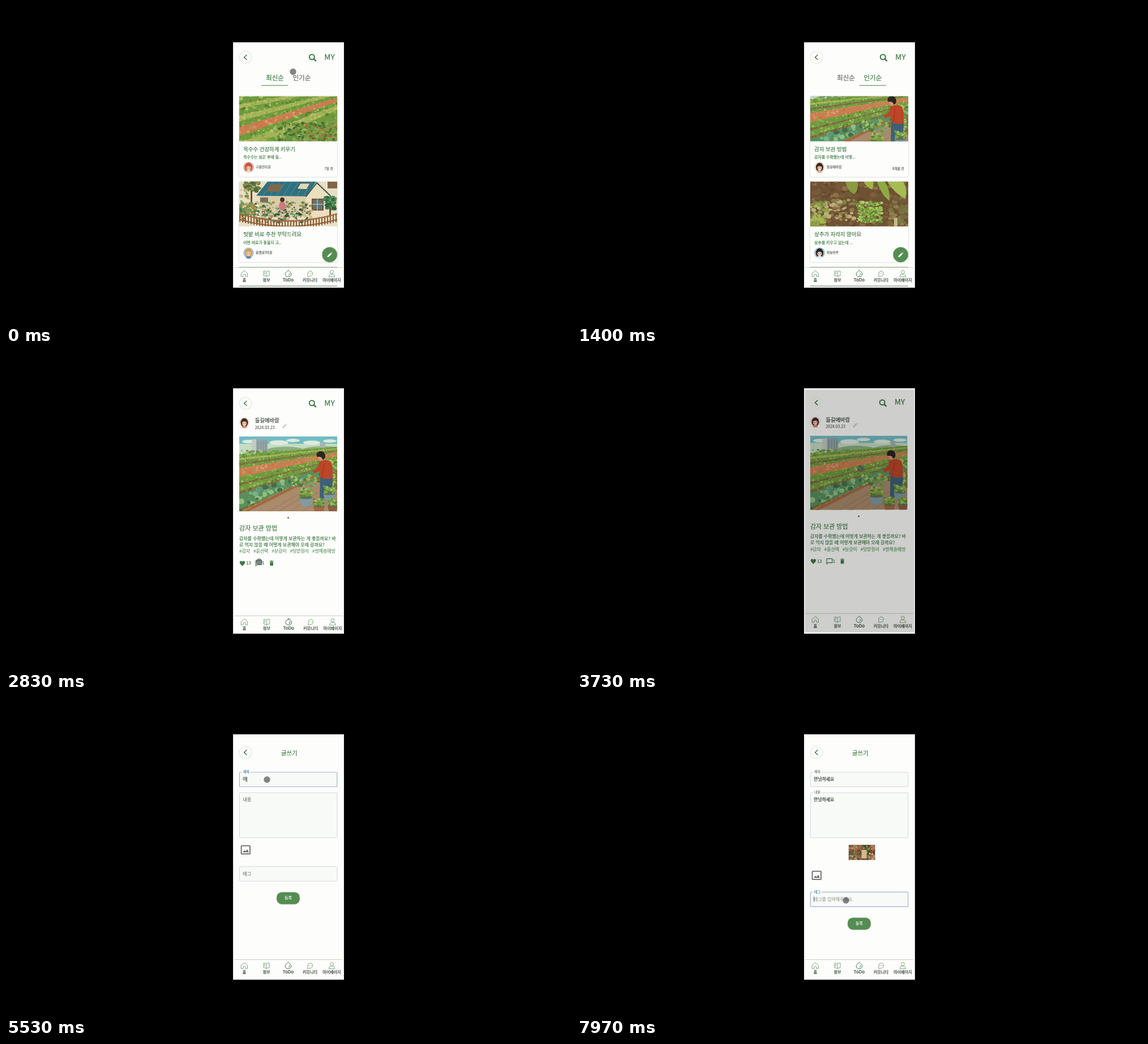
An HTML page for the animation above (8 s loop, 998 by 561 pixels).

```html
<!DOCTYPE html>
<html lang="ko">
<head>
<meta charset="utf-8">
<title>Garden board</title>
<style>
html, body { margin: 0; width: 100%; height: 100%; overflow: hidden; background: #000; }
svg { display: block; }
#stage { width: 100vw; height: 100vh; }
text {
  font-family: "Noto Sans CJK KR", "Noto Sans CJK", "Noto Sans", sans-serif;
  font-weight: 500; white-space: pre;
  fill: currentColor; stroke: currentColor; stroke-width: .2px;
}
.shade { filter: drop-shadow(0 .7px .8px rgba(60, 80, 60, .34)); }
.line { fill: none; stroke-linecap: round; stroke-linejoin: round; }
.soft { filter: blur(.6px); }
</style>
</head>
<body>
<svg id="stage" viewBox="0 0 998 561" preserveAspectRatio="none"></svg>
<script>
const LOOP = 8000;
const GREEN = '#3f7a46', SOFT = '#6f9f70', FILL = '#548d51', GREY = '#626863';
const ZOOM = 0.9915;

// Markup helpers
const text = (x, y, size, str, color = GREEN, extra = '') =>
  `<text x="${x}" y="${y}" font-size="${size}" color="${color}" ${extra}>${str}</text>`;
const mid = 'text-anchor="middle"';
const rect = (x, y, w, h, fill, extra = '') =>
  `<rect x="${x}" y="${y}" width="${w}" height="${h}" fill="${fill}" ${extra}/>`;
const disc = (x, y, r, fill, extra = '') => `<circle cx="${x}" cy="${y}" r="${r}" fill="${fill}" ${extra}/>`;
const oval = (x, y, rx, ry, fill, extra = '') =>
  `<ellipse cx="${x.toFixed(1)}" cy="${y.toFixed(1)}" rx="${rx.toFixed(1)}" ry="${ry.toFixed(1)}" fill="${fill}" ${extra}/>`;
const shape = (d, fill, extra = '') => `<path d="${d}" fill="${fill}" ${extra}/>`;
const stroke = (d, color, w = 1) => `<path class="line" d="${d}" stroke="${color}" stroke-width="${w}"/>`;
const group = (id, body, extra = '') => `<g id="${id}" ${extra}>${body}</g>`;
const photo = (x, y, w, h, top, body) =>
  `<svg x="${x}" y="${y}" width="${w}" height="${h}" viewBox="0 ${top} ${w} ${h}">${body}</svg>`;

const random = seed => () => (seed = seed * 16807 % 2147483647) / 2147483647;
const pick = (rnd, list) => list[Math.floor(rnd() * list.length)];
const lerp = (a, b, k) => a + (b - a) * k;
const clamp = v => Math.max(0, Math.min(1, v));
const ease = k => k * k * (3 - 2 * k);
const ramp = (t, start, length) => ease(clamp((t - start) / length));

function leaves(seed, n, [x0, y0, x1, y1], colors, r) {
  const rnd = random(seed);
  let out = '';
  for (let i = 0; i < n; i++) {
    const s = r * (0.5 + rnd());
    out += oval(lerp(x0, x1, rnd()), lerp(y0, y1, rnd()), s, s * 0.75, pick(rnd, colors));
  }
  return out;
}

// Planted rows that run from the left edge to one vanishing point
function rows(seed, edges, beds, vx, vy, n) {
  const rnd = random(seed);
  let out = '';
  beds.forEach((colors, i) => {
    const a = edges[i], b = edges[i + 1];
    out += shape(`M0 ${a}V${b}L${vx} ${vy}Z`, colors[0]);
    for (let j = 0; j < n; j++) {
      const x = rnd() * 173, k = x / vx, r = 0.5 + (b - a) * (1 - k) * (0.05 + rnd() * 0.13);
      out += oval(x, lerp(lerp(a, b, rnd()), vy, k), r * 1.2, r, pick(rnd, colors));
    }
  });
  return out;
}

const lush = ['#6f9a3e', '#8fb84e', '#557f35', '#a9c465', '#7aa545'];
const teal = ['#5a8f5c', '#7fb187', '#40704a', '#94bd83', '#5f9a78'];
const coral = ['#c87d4f', '#dd8a5a', '#a79a52', '#d56c4a', '#e09c6c'];
const soil = ['#80683c', '#9a7d4c', '#566b33', '#7f9a48', '#a78d5c'];
const gold = ['#a3b356', '#bcc26c', '#8aa84a', '#c9b566'];

function pot(x, y, s, color) {
  return shape(`M${x - 11 * s} ${y}h${22 * s}l${-3 * s} ${13 * s}q${-8 * s} ${4 * s} ${-16 * s} 0z`, color) +
    oval(x, y, 11 * s, 2.4 * s, '#5f6f5a') +
    leaves(Math.round(x * 7919 + 13), 60, [x - 10 * s, y - 15 * s, x + 10 * s, y - 1], lush, 1.9 * s);
}

function fieldScene() {
  const clouds = [[18, 9, 13], [70, 11, 17], [95, 7, 12], [128, 11, 15], [160, 8, 12]]
    .map(([x, y, r]) => oval(x, y, r, r * 0.25, '#dcebdc')).join('');
  return rect(0, 0, 173, 132, '#72bcc4') + rect(0, 13, 173, 24, '#c6dcc2') + clouds +
    oval(82, 27, 38, 9, '#8db083') + oval(148, 26, 40, 9, '#94b384') +
    rect(22, 5, 28, 30, '#94a6a6') + rect(22, 5, 8, 30, '#c3cbc4') +
    stroke('M33 8v24M38 8v24M43 8v24M47 8v24', '#788d8e', 1) + rect(143, 10, 9, 20, '#a3b4ad') +
    leaves(90211, 150, [0, 25, 173, 35], ['#7a9f5c', '#94b36c', '#afc384', '#6a9052'], 2.2) +
    rows(48271, [32, 38, 42, 47, 51, 56, 60, 72, 83, 87, 97, 102, 128, 140, 200],
      [lush, gold, lush, soil, lush, coral, coral, lush, soil, lush, soil, teal, soil, soil], 300, 8, 75) +
    shape('M14 132L88 95L130 78L173 90V132Z', '#a98a6b') +
    stroke('M52 132L112 98M70 132L130 96M90 132L140 98M112 132L156 100M136 132L173 102', '#8a6a4e', 0.7) +
    stroke('M12 132L84 96L132 71', '#a5683f', 4) + stroke('M8 131L82 93L130 69', '#c0845a', 1) +
    leaves(66103, 110, [92, 68, 136, 88], [...teal, ...lush], 2) +
    leaves(27103, 60, [160, 40, 173, 92], lush, 2.2) +
    // gardener seen from behind
    shape('M143 72L142 112Q147 117 150 112L155 86L158 110H164L165 70Z', '#3c6079') +
    shape('M141 45Q153 38 162 45Q167 58 164 74Q153 77 143 72Q141 65 143 61L132 65L130 61L139 54Z', '#bd4528') +
    stroke('M150 48Q149 60 146 72', '#96331f', 1) +
    oval(145, 37, 5.5, 6, '#d49b77') + shape('M137 36Q135 27 143 26Q152 26 152 35Q151 41 147 41Q147 35 137 36Z', '#2c2522') +
    pot(118, 108, 1.05, '#7f9ba3') + pot(159, 101, 0.95, '#7898a2') + pot(141, 123, 0.9, '#a3673f') + pot(165, 122, 0.8, '#8a5f3f');
}

function stripesScene() {
  return rect(0, 0, 173, 80, '#7f9a45') +
    `<g class="soft">${rows(77773, [-4, 14, 22, 34, 44, 54, 58, 70, 82, 100, 130],
      [lush, gold, lush, gold, lush, coral, coral, lush, gold, lush], 330, -45, 75)}
    ${leaves(30313, 220, [66, 46, 173, 80], ['#4f7832', '#6a9440', '#8dab54', '#456a30', '#7a8a48'], 2.3)}
    ${leaves(51517, 16, [116, 46, 173, 78], ['#b9673d', '#c4563a'], 2)}</g>`;
}

function houseScene() {
  let fence = '';
  for (let x = 0; x < 173; x += 5) {
    const y = 56 + 12 * Math.sin(Math.PI * x / 173);
    fence += rect(x, y, 2, 15, '#8a5834');
  }
  return rect(0, 0, 173, 80, '#e9dfc4') +
    rect(20, 6, 3, 32, '#6f4d30') + leaves(71011, 60, [9, -1, 36, 17], ['#6e7f40', '#8b9550', '#52693a'], 2.6) +
    leaves(12007, 30, [0, 14, 16, 66], ['#d1a25a', '#76935a', '#c4b480'], 2.8) +
    shape('M36 24H122L137 4L160 26V62H36Z', '#d9cda9') + shape('M118 26L137 4L160 26V64H118Z', '#eadfbf') +
    shape('M30 25L50 0H136L118 26Z', '#2f7180') +
    stroke('M42 24L60 1M54 24L71 1M66 24L82 1M78 25L93 1M90 25L104 1M102 25L115 1M114 25L127 1', '#5392a0', 1) +
    stroke('M118 26L137 2L161 25', '#3c5450', 2) +
    shape('M48 17L54 5H77L71 18Z', '#80694b') + shape('M102 13L108 3H125L119 14Z', '#d8dabe', 'stroke="#574532"') +
    rect(37, 28, 14, 9, '#777158') + rect(129, 31, 19, 19, '#597579', 'stroke="#7a4d2c" stroke-width="2"') +
    stroke('M138 31v19M129 40h19', '#e6d6ad', 1) +
    leaves(82009, 240, [26, 36, 128, 72], ['#426a45', '#658b53', '#2f5240', '#8b9a5b', '#ad8658', '#c9b98c'], 2.1) +
    oval(76, 43, 6, 8, '#cf7684') + disc(76, 32, 4, '#4a3028') +
    leaves(44017, 70, [151, 27, 169, 49], ['#3d7c4b', '#55905a', '#2f6040'], 2.8) + rect(159, 46, 3, 16, '#6f4d30') +
    leaves(19013, 40, [0, 38, 28, 60], ['#4b7d51', '#a98b4c', '#6f9a58'], 2.8) +
    rect(156, 0, 17, 12, '#836348') + fence +
    stroke('M0 57Q86 82 173 57', '#a06b3f', 2.4) + stroke('M0 67Q86 91 173 67', '#8f5c36', 2);
}

function soilScene() {
  return rect(0, 0, 173, 80, '#6f5134') +
    `<g class="soft">${leaves(61007, 190, [0, 0, 173, 80], ['#80603c', '#634a2e', '#8f7048', '#6b5f34', '#775a38'], 4)}
    ${leaves(23011, 60, [2, 36, 32, 70], ['#93a14b', '#768a42', '#a9b25c', '#b8b37c'], 3.2)}
    ${leaves(39019, 55, [32, 32, 78, 68], ['#b09867', '#8a7b4e', '#c2ac7c', '#7c8446'], 3)}
    ${leaves(91009, 40, [138, 40, 173, 78], ['#7d6a3e', '#927f52', '#6f7c40'], 3.4)}
    ${shape('M62 0Q66 18 78 22Q86 14 84 0Z', '#8a9a40') + shape('M94 0Q101 12 110 14L112 0Z', '#a1b548')}
    ${shape('M118 0Q126 25 140 34Q142 18 132 0Z', '#8fa942') + shape('M136 0Q150 22 168 30Q173 14 164 0Z', '#a6bb52')}
    ${leaves(55021, 240, [83, 36, 127, 72], ['#80a843', '#a0c058', '#668f38', '#b3cb70', '#74953e'], 2.2)}
    ${rect(148, 64, 6, 16, '#c7b886') + leaves(13007, 30, [0, 66, 30, 80], ['#a4b451', '#8d9c46'], 3.4)}</g>`;
}

function cloverScene() {
  const rnd = random(810233);
  let out = rect(0, 0, 173, 80, '#0c3c1a');
  for (let i = 0; i < 170; i++) {
    const x = rnd() * 173, y = rnd() * 80, r = 2.3 + rnd() * 2.2, turn = rnd() * 6.28;
    const color = pick(rnd, ['#145f2a', '#1d7d38', '#289247', '#0f4a20', '#3fae5c', '#2a8a3a']);
    for (let k = 0; k < 3; k++) {
      const a = turn + k * 2.09;
      out += oval(x + Math.cos(a) * r, y + Math.sin(a) * r, r, r * 0.9, color);
    }
    out += disc(x.toFixed(1), y.toFixed(1), 0.6, '#8fd08a');
  }
  return out + leaves(70001, 9, [26, 48, 44, 68], ['#6fc041', '#8ad04c', '#4fa83a'], 4);
}

function collage() {
  const rnd = random(60607);
  let out = rect(0, 0, 47, 27, '#705a3c');
  for (let y = 0; y < 27; y += 9) for (let x = 0; x < 47; x += 7.8)
    out += rect(x + 0.4, y + 0.4, 7.2, 8.3, pick(rnd, ['#5c5b37', '#876642', '#4f472e', '#a4845d'])) +
      leaves(Math.floor(rnd() * 1e6) + 99, 6, [x + 1, y + 1, x + 7, y + 8], ['#8fa04d', '#c4503a', '#d0bc93', '#3d4a2a'], 1.4);
  return out + rect(23, 9, 9, 15, '#d2b98d');
}

function avatar(x, y, r, back, hair, top) {
  return disc(x, y, r, back) + oval(x, y, r * 0.7, r * 0.84, hair) +
    oval(x, y + r * 0.84, r * 0.46, r * 0.24, top) + oval(x, y + r * 0.12, r * 0.43, r * 0.5, '#f3cdb2') +
    shape(`M${x - r * 0.5} ${y}q${r * 0.5} ${-r * 0.95} ${r} 0q${-r * 0.5} ${-r * 0.45} ${-r} 0`, hair) +
    disc(x - r * 0.18, y + r * 0.14, 0.7, '#54362e') + disc(x + r * 0.18, y + r * 0.14, 0.7, '#54362e');
}

// Shared parts
const backButton = y => disc(423, y, 10.3, '#fcfdfb', 'class="shade"') + stroke(`M425 ${y - 4}L420.5 ${y}L425 ${y + 4}`, GREEN, 1.6);
const header = backButton(90.5) + disc(540.3, 90, 4.5, 'none', `stroke="${GREEN}" stroke-width="2.1"`) +
  stroke('M543.8 93.4L547 96.6', GREEN, 2.5) + text(571.5, 94.6, 13.6, 'MY', GREEN, mid);

function navBar() {
  const labels = [[421, '홈'], [460, '정보'], [498.5, 'ToDo'], [537, '커뮤니티'], [575.5, '마이페이지']];
  return rect(403, 461.5, 191, 29, '#fdfdfc') + rect(403, 461, 191, 0.9, '#c3cfbf') +
    stroke('M415.5 471.5L421 466.8L426.5 471.5V477.3H423V474Q421 472 419 474V477.3H415.5Z', SOFT, 0.9) +
    stroke('M460 469Q457.5 467 455 467.6V476Q458 475.6 460 477.3Q462 475.6 465 476V467.6Q462.5 467 460 469V477M457 470v3', SOFT, 0.9) +
    stroke('M498.5 466.3Q493 470.5 493.2 473Q493.6 477.6 498.5 477.6Q503.4 477.6 503.8 473Q504 470.5 498.5 466.3M500.5 471.5q1.5 2.4-1.2 4', GREEN, 1) +
    stroke('M532.8 477L533 471.8Q534 467.6 537.3 467.6Q541.4 468 541.5 472Q541.2 476.6 537 476.8ZM535.3 472h.1M537.2 472h.1M539.1 472h.1', SOFT, 0.9) +
    disc(575.5, 469.3, 2.9, 'none', `stroke="${SOFT}" stroke-width=".9"`) +
    stroke('M570.3 477.3Q570.5 473.4 573.5 473Q575.5 474 577.5 473Q580.5 473.4 580.7 477.3Z', SOFT, 0.9) +
    labels.map(([x, s]) => text(x, 486.2, s === 'ToDo' ? 8 : 7.1, s, '#333b34', mid)).join('');
}

// List page
const cardTops = [159.5, 309.8];
function cardText(y, title, note, name, date) {
  return text(419.3, y + 96, 9.4, title) + text(419.3, y + 109.8, 6.85, note) +
    text(441, y + 126.8, 5.75, name, GREY) + text(577.8, y + 129.6, 5.75, date, GREY, 'text-anchor="end"');
}
const pics = (a, b) => photo(412, cardTops[0], 173, 79, 0, a) + photo(412, cardTops[1], 173, 79, 0, b);
const pencil = (x, y, s, color) =>
  `<path transform="translate(${x} ${y}) scale(${s})" d="M-4 4V2L1.6-3.6L3.6-1.6L-2 4ZM2.3-4.2L3-4.8L4.8-3L4.2-2.3Z" fill="${color}"/>`;

function listPage() {
  const clover = cloverScene();
  return header + text(475, 130.7, 11.6, '최신순', GREEN, mid + ' id="tabNew"') +
    text(522.4, 130.7, 11.6, '인기순', GREY, mid + ' id="tabHot"') +
    rect(451, 139.6, 47.3, 1.1, FILL, 'id="mark"') +
    cardTops.map(y => rect(412, y, 173, 142, '#fdfefc', 'rx="2" class="shade"')).join('') +
    group('newText', cardText(cardTops[0], '옥수수 건강하게 키우기', '옥수수는 심은 후에 밀...', '구름언덕길', '7일 전') +
      cardText(cardTops[1], '텃밭 비료 추천 부탁드려요', '어떤 비료가 좋을지 고...', '봄햇살3마을', '')) +
    group('hotText', cardText(cardTops[0], '감자 보관 방법', '감자를 수확했는데 어떻...', '들길에바람', '8개월 전') +
      cardText(cardTops[1], '상추가 자라지 않아요', '상추를 키우고 있는데 ...', '하늘마루', '')) +
    group('newPics', pics(stripesScene(), houseScene()) +
      avatar(428.5, 284.5, 9.4, '#e9a79a', '#c4553e', '#efe0d2') + avatar(428.5, 435.5, 9.4, '#a9c6e6', '#d9a052', '#5e86b5')) +
    group('hotPics', photo(412, cardTops[0], 173, 79, 26.5, fieldScene()) + photo(412, cardTops[1], 173, 79, 0, soilScene()) +
      avatar(428.5, 284.5, 9.4, '#f0e4cd', '#3d2a25', '#e3b3a2') + avatar(428.5, 435.5, 9.4, '#9cc0c9', '#22262c', '#e8eef0')) +
    group('blankPics', pics(clover, clover)) +
    rect(412, 460, 173, 1, '#a9c1a0') + navBar() + rect(412, 493.4, 173, 1.2, '#7f9a78') +
    disc(571.7, 438.7, 13.2, FILL, 'class="shade"') + pencil(571.7, 439, 1, '#fff');
}

// Post page
function postPage() {
  const tags = [[412, '#감자'], [437, '#흙선택'], [469.5, '#분갈이'], [501.5, '#텃밭정리'], [541, '#병해충예방']];
  return header + avatar(421, 124.5, 9.3, '#f0e4d3', '#4a2a24', '#d98a7c') +
    text(439.7, 124.2, 9.3, '들길에바람', '#2d3a2f') + text(439.7, 135.5, 7, '2024.03.23', GREY) + pencil(492, 130.5, 0.95, '#c9cfc6') +
    `<g style="clip-path: inset(0 round 3px)">${photo(412, 149, 173, 132, 0, fieldScene())}</g>` +
    disc(498.5, 292.5, 1.3, '#33433a') + text(412, 315, 11.05, '감자 보관 방법') +
    text(412, 331.5, 7.95, '감자를 수확했는데 어떻게 보관하는 게 좋을까요? 바') +
    text(412, 342.5, 7.95, '로 먹지 않을 때 어떻게 보관해야 오래 갈까요?') +
    tags.map(([x, s]) => text(x, 354, 7.95, s, SOFT)).join('') +
    shape('M417.5 377.5Q412.7 373.5 412.7 371Q413 368.4 415.3 368.4Q416.8 368.5 417.5 370Q418.2 368.5 419.8 368.4Q422.2 368.6 422.3 371Q422.2 373.6 417.5 377.5Z', GREEN) +
    text(424, 375.3, 8, '13') + stroke('M441.3 377.3V368H451.2V375.2H443.4Z', GREEN, 1.2) + text(452, 375.3, 8, '1') +
    shape('M465.8 368.5h2l.6-.7h1.4l.6.7h2v1.2h-6.6zM466.3 370.4h5.6v5.7q0 1-1 1h-3.6q-1 0-1-1z', GREEN) +
    `<g transform="translate(${-3.5 / ZOOM} 0) scale(${1 / ZOOM})">${navBar()}</g>`;
}

// Form page
const fields = {
  title: { y: 131, h: 25.5, label: '제목', hint: '', focus: [5330, 6230] },
  body: { y: 167, h: 79.5, label: '내용', hint: '', focus: [6280, 7000] },
  tag: { y: 297.3, h: 25.8, label: '태그', hint: '태그를 입력해주세요.', focus: [7720, LOOP] }
};
function field(id) {
  const { y, h, label, hint } = fields[id];
  return rect(412.4, y, 172.4, h, '#f7faf6', `rx="1.6" id="${id}Box"`) +
    rect(416.5, y - 2, 15, 4, '#fdfdfc', `id="${id}Gap"`) + text(0, 0, 8, label, '#777', `id="${id}Label"`) +
    text(418.3, y + 15.4, 7.9, hint, '#a3a8a4', `id="${id}Hint"`) +
    text(418.3, y + 15.4, 7.8, '', '#2f3530', `id="${id}Text"`) + rect(418, y + 8.3, 0.8, 9, '#333', `id="${id}Caret"`);
}
function formPage() {
  return backButton(96) + text(500.3, 101.2, 10.3, '글쓰기', GREEN, mid) + field('title') + field('body') +
    group('thumb', photo(479.6, 259, 47, 26.6, 0, collage())) +
    group('lower', rect(415.6, 260.6, 15.4, 14.6, 'none', 'rx="1" stroke="#666b67" stroke-width="1.8"') +
      shape('M418 272.3L421.2 268.4L423.3 270.8L426 267L429 272.3Z', '#666b67') + field('tag') +
      rect(478.2, 342.7, 40.6, 21, FILL, 'rx="9" class="shade"') + text(498.5, 355, 7, '등록', '#fff', mid)) + navBar();
}

document.getElementById('stage').innerHTML =
  rect(0, 0, 998, 561, '#000') + rect(401, 64, 196, 433, '#eef2f3') + rect(402.5, 66.5, 193, 428, '#fdfdfc') +
  group('list', listPage()) + group('post', postPage()) + group('form', formPage()) +
  rect(402.5, 66.5, 193, 428, '#000', 'id="dim"') +
  disc(0, 0, 5.7, '#46464a', 'id="dot" fill-opacity=".66"');

const $ = id => document.getElementById(id);
const show = (id, on) => { $(id).style.display = on ? '' : 'none'; };
const set = (id, attrs) => { for (const k in attrs) $(id).setAttribute(k, attrs[k]); };

const path = [[0, 507, 116], [30, 507, 116], [170, 519, 126], [700, 519, 126], [1180, 500, 206], [1950, 500, 206],
  [2600, 447, 370], [2980, 447, 370], [3500, 501, 206], [3780, 501, 206], [4060, 424, 91], [4220, 424, 91],
  [4750, 571, 438], [4990, 571, 438], [5350, 461, 144], [6150, 461, 144], [6270, 450, 181], [6900, 450, 181],
  [7060, 423, 268], [7300, 423, 268], [7700, 475, 357], [LOOP, 475, 357]];
function dotAt(t) {
  const i = Math.max(1, path.findIndex(p => p[0] > t));
  const [t0, x0, y0] = path[i - 1], [t1, x1, y1] = path[i];
  const k = ramp(t, t0, t1 - t0);
  return [lerp(x0, x1, k), lerp(y0, y1, k)];
}

const strokes = ['', 'ㅇ', '아', '안', '안ㄴ', '안녀', '안녕', '안녕ㅎ', '안녕하', '안녕핫', '안녕하세', '안녕하셍', '안녕하세요'];
const typed = (t, start, step) => strokes[Math.max(0, Math.min(strokes.length - 1, Math.floor((t - start) / step) + 1))];

function updateField(id, t, value) {
  const { y, hint, focus: [from, to] } = fields[id];
  const focused = t >= from && t < to;
  const up = value ? 1 : ramp(t, from, 150) * focused;
  set(id + 'Box', { stroke: focused ? '#a9afd8' : '#cdd0de', 'stroke-width': focused ? 1.2 : 0.8 });
  set(id + 'Label', { x: lerp(418.3, 419, up), y: lerp(y + 15.2, y + 1.3, up), 'font-size': lerp(8, 5.9, up), color: focused ? '#3f7fb5' : '#777d78' });
  show(id + 'Gap', up > 0.5);
  show(id + 'Hint', hint && focused && up === 1 && !value);
  $(id + 'Text').textContent = value;
  set(id + 'Caret', { x: 418 + value.length * 7.18 });
  show(id + 'Caret', focused && (t - from) % 1060 < 530);
}

function render(t) {
  const page = t < 1800 || (t >= 4100 && t < 4970) ? 'list' : t < 4100 ? 'post' : 'form';
  ['list', 'post', 'form'].forEach(id => show(id, id === page));

  const hot = t >= 420 && t < 1800;
  const blank = (t >= 470 && t < 760) || (t >= 4100 && t < 4350);
  show('newText', !hot);
  show('hotText', hot);
  show('newPics', !hot && !blank);
  show('hotPics', hot && !blank);
  show('blankPics', blank);
  set('tabNew', { color: hot ? GREY : GREEN });
  set('tabHot', { color: hot ? GREEN : GREY });
  set('mark', { x: 451 + (hot ? 47.7 * ramp(t, 420, 300) : 0) });

  set('post', { transform: t < 2980 ? '' : `translate(3.5 -.3) scale(${ZOOM})` });
  set('dim', { opacity: 0.5 * (clamp((t - 2980) / 225) - clamp((t - 3610) / 195)) });

  const added = t >= 7300;
  show('thumb', added);
  set('lower', { transform: `translate(0 ${added ? 45 : 0})` });
  updateField('title', t, typed(t, 5460, 55));
  updateField('body', t, typed(t, 6350, 42));
  updateField('tag', t, '');

  const [cx, cy] = dotAt(t);
  set('dot', { cx, cy });
  show('dot', t < 1180 || t > 1560);
}

const start = performance.now();
function tick() {
  render((performance.now() - start) % LOOP);
  requestAnimationFrame(tick);
}
render(0);
requestAnimationFrame(tick);
</script>
</body>
</html>
```
